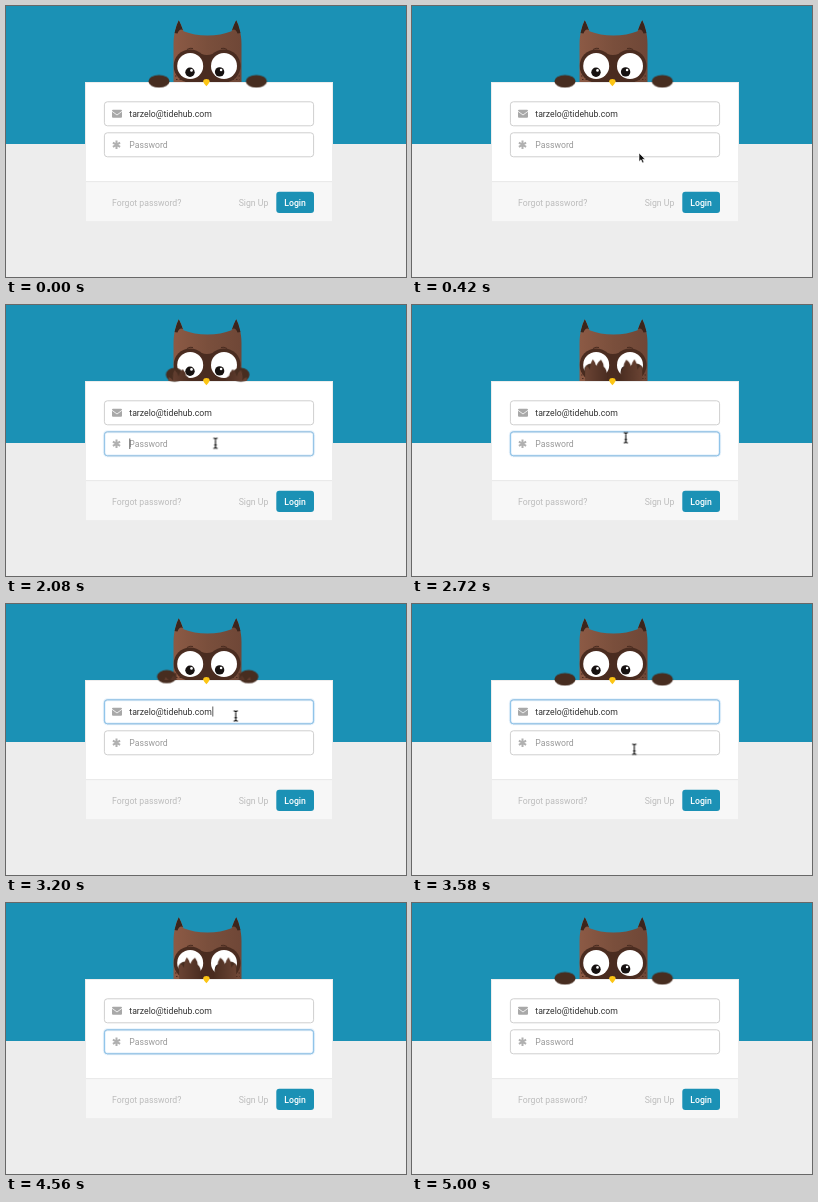
Animation, 400 px wide and 271 px high, one loop 5.4 s. Source, as an HTML page:

```html
<!DOCTYPE html>
<html lang="en">
<head>
<meta charset="utf-8">
<title>Owl login</title>
<style>
  html, body { margin: 0; width: 100%; height: 100%; overflow: hidden; background: #ededed; }
  svg { display: block; width: 100vw; height: 100vh; }
  text { font: 8.7px Roboto, Arial, sans-serif; }
  .field { fill: #fff; stroke: #cfcfcf; }
  .icon { fill: #a8a8a8; }
  .muted { fill: #bcbcbc; }
  .ring rect { fill: none; stroke: #8cc4ec; }
  .ring .glow { stroke: #66afe9; stroke-opacity: .16; stroke-width: 3; }
  .hand { fill: #472d20; transform-origin: 153px 75.4px; }
  .arm { transform-origin: 12.5px 20.3px; }
</style>
</head>
<body>
<svg viewBox="0 0 400 271" preserveAspectRatio="none">
  <defs>
    <linearGradient id="fur" x1="0" x2="1">
      <stop offset="0" stop-color="#8c5a45"/>
      <stop offset=".5" stop-color="#7a4f3c"/>
      <stop offset="1" stop-color="#6f4737"/>
    </linearGradient>
    <linearGradient id="wing" x1="0" x2="1">
      <stop offset="0" stop-color="#6b4434"/>
      <stop offset="1" stop-color="#4a2d21"/>
    </linearGradient>
    <clipPath id="ledge"><rect x="133" y="49.75" width="140" height="25.8"/></clipPath>
    <clipPath id="headClip"><use href="#headShape"/></clipPath>
    <path id="headShape" d="M167.5 76 V38 C167.5 32 168.3 28 169 25 Q170 19 172.8 14.3 Q175.5 19 177.5 25.3 Q188 29.5 201.5 29.5 Q215 29.5 225.5 25.3 Q227.5 19 230.2 14.3 Q233 19 234 25 C234.7 28 235.5 32 235.5 38 V76 Z"/>
    <g id="eye">
      <circle cx="184.2" cy="60" r="16.6" fill="#4a2c20"/>
      <circle cx="184.2" cy="60" r="13" fill="#fff"/>
    </g>
    <path id="limb" fill="url(#wing)" d="M2 41 V20 Q1.5 15 3 11 Q5.5 12 7 15 Q7 8.5 9.8 4.5 Q12.5 7.5 13 12 Q14.5 7 18 5 Q20.5 8.5 20.6 12 Q23.5 14 24 20 L25 41 Z"/>
  </defs>

  <rect width="400" height="271" fill="#ededed"/>
  <rect width="400" height="138" fill="#1b91b5"/>

  <rect x="79" y="76" width="248" height="140.5" fill="#fff"/>
  <rect x="80" y="176" width="246" height="40" fill="#f7f7f7"/>
  <path d="M80 175.7 H326" stroke="#e6e6e6"/>
  <rect x="79.5" y="76.5" width="247" height="139.5" fill="none" stroke="#000" stroke-opacity=".07"/>

  <rect class="field" x="98.4" y="95.8" width="209.2" height="24" rx="3"/>
  <rect class="field" x="98.4" y="126.8" width="209.2" height="24" rx="3"/>
  <g class="ring" id="mailRing" opacity="0">
    <rect class="glow" x="98.4" y="95.8" width="209.2" height="24" rx="3"/>
    <rect x="98.4" y="95.8" width="209.2" height="24" rx="3"/>
  </g>
  <g class="ring" id="passRing" opacity="0">
    <rect class="glow" x="98.4" y="126.8" width="209.2" height="24" rx="3"/>
    <rect x="98.4" y="126.8" width="209.2" height="24" rx="3"/>
  </g>

  <rect class="icon" x="106" y="103.8" width="10" height="8" rx="1"/>
  <path d="M106 105.3 L111 109 L116 105.3" fill="none" stroke="#fff" stroke-width=".8"/>
  <path d="M110.5 134.6 V143 M106.9 136.7 L114.1 140.9 M114.1 136.7 L106.9 140.9" stroke="#b0b0b0" stroke-width="2"/>

  <text x="123.3" y="110.7" fill="#333">tarzelo@tidehub.com</text>
  <text x="123.3" y="141.8" fill="#999">Password</text>
  <text class="muted" x="106" y="199.6">Forgot password?</text>
  <text class="muted" x="232.7" y="199.6">Sign Up</text>
  <rect x="270.3" y="185.8" width="37.7" height="21.3" rx="3" fill="#1b91b5"/>
  <text x="278.3" y="199.6" fill="#fff" style="font-weight:500">Login</text>

  <path id="mailCaret" d="M206.8 102.5 V112.5" stroke="#333" stroke-width=".8" opacity="0"/>
  <path id="passCaret" d="M123.8 133.5 V144" stroke="#333" stroke-width=".8" opacity="0"/>

  <use href="#headShape" fill="url(#fur)"/>
  <g clip-path="url(#headClip)">
    <path d="M168 27 L172.8 13 L177 24 Q173.5 22 171.5 27.5 Z M235 27 L230.2 13 L226 24 Q229.5 22 231.5 27.5 Z" fill="#3b251c"/>
    <path d="M181 43.5 Q184 41.5 187 42.5 M215 42.5 Q218 41.5 221 43.5" fill="none" stroke="#4a2c20"/>
    <path d="M190 45 Q201 53 212 45 L214 77 H188 Z" fill="#4a2c20"/>
    <use href="#eye"/>
    <use href="#eye" transform="translate(402.2 0) scale(-1 1)"/>
    <path d="M169 70 H174 M170 73.5 H180 M229 70 H235 M223 73.5 H234" stroke="#4a2c20" stroke-dasharray="1.5 2"/>
  </g>
  <g fill="#161110"><circle cx="184" cy="66.3" r="4.7"/><circle cx="213.6" cy="65.9" r="4.7"/></g>
  <g fill="#fff"><circle cx="185.5" cy="64.4" r="1.3"/><circle cx="215.1" cy="64" r="1.3"/></g>
  <path d="M197 75.2 Q197.4 73 200.4 73 Q203.4 73 203.8 75.2 Q202.6 78.3 200.4 80.3 Q198.2 78.3 197 75.2 Z" fill="#fcc514"/>

  <circle class="hand" cx="153" cy="75.4" r="10.6"/>
  <g transform="translate(403.4 0) scale(-1 1)"><circle class="hand" cx="153" cy="75.4" r="10.6"/></g>
  <g clip-path="url(#ledge)">
    <g transform="translate(146.1 74.75)"><use class="arm" href="#limb"/></g>
    <g transform="translate(257.3 74.75) scale(-1 1)"><use class="arm" href="#limb"/></g>
  </g>

  <g id="pointer">
    <path id="arrow" d="M0 0 V8.6 L2 6.8 L3.5 10 L5 9.3 L3.6 6.2 H6.2 Z" fill="#111" stroke="#fff" stroke-width=".6"/>
    <path id="beam" d="M-2.2 -5 H-.8 L0 -4.2 L.8 -5 H2.2 M0 -4.4 V4.4 M-2.2 5 H-.8 L0 4.2 L.8 5 H2.2 M-1.3 1.8 H1.3" fill="none" stroke="#111" stroke-width="1.1" opacity="0"/>
  </g>
</svg>
<script>
  const LOOP = 5400, MOVE = 300, FADE = 140;
  const start = document.timeline.currentTime || 0;
  const $ = id => document.getElementById(id);

  // steps: [ms, value, easing towards the next step]
  function play(el, prop, steps) {
    const all = [[0, steps[0][1]], ...steps, [LOOP, steps[steps.length - 1][1]]];
    const frames = all.map(([ms, value, easing = 'linear']) =>
      ({ offset: ms / LOOP, [prop]: value, easing }));
    el.animate(frames, { duration: LOOP, iterations: Infinity }).startTime = start;
  }

  // spans during which an element is visible, with an optional fade
  function show(el, spans, fade = 0) {
    play(el, 'opacity', spans.flatMap(([on, off]) =>
      [[on, 0], [on + fade, 1], [off, 1], [off + fade, 0]]));
  }

  const covers = [[1955, 3045], [3735, 4700]];

  function cover(selector, rest, raised) {
    const steps = covers.flatMap(([up, down]) => [
      [up, rest, 'ease-out'], [up + MOVE, raised],
      [down, raised, 'ease-out'], [down + MOVE, rest]
    ]);
    document.querySelectorAll(selector).forEach(el => play(el, 'transform', steps));
  }

  cover('.hand', 'translate(0px, 0px) scale(1, .6)', 'translate(26.25px, -9.4px) scale(.7, .7)');
  cover('.arm', 'translate(0px, 0px) rotate(-20deg)', 'translate(25px, -25px) rotate(0deg)');

  show($('passRing'), covers, FADE);
  show($('mailRing'), [[3045, 3735]], FADE);
  show($('passCaret'), [[1955, 2455], [2955, 3045], [3735, 4235]]);
  show($('mailCaret'), [[3045, 3545]]);

  const at = (x, y) => `translate(${x}px, ${y}px)`;
  play($('pointer'), 'transform', [
    [120, at(410, 212)],
    [120, at(391, 205), 'ease-out'],
    [420, at(227, 147)],
    [1320, at(227, 147)],
    [1320, at(213.5, 145)],
    [1340, at(213.5, 145)],
    [1420, at(212.8, 139)],
    [1600, at(212.8, 139)],
    [1680, at(209.5, 138.3)],
    [2600, at(209.5, 138.3), 'ease-in-out'],
    [2980, at(229.7, 112)],
    [3380, at(229.7, 112), 'ease-in-out'],
    [3580, at(222.3, 145.3)],
    [4060, at(222.3, 145.3), 'ease-in'],
    [4260, at(385, 157)],
    [4320, at(410, 159)]
  ]);
  show($('beam'), [[1360, 4200]]);
  play($('arrow'), 'opacity', [[1360, 1], [1360, 0], [4200, 0], [4200, 1]]);
</script>
</body>
</html>
```
